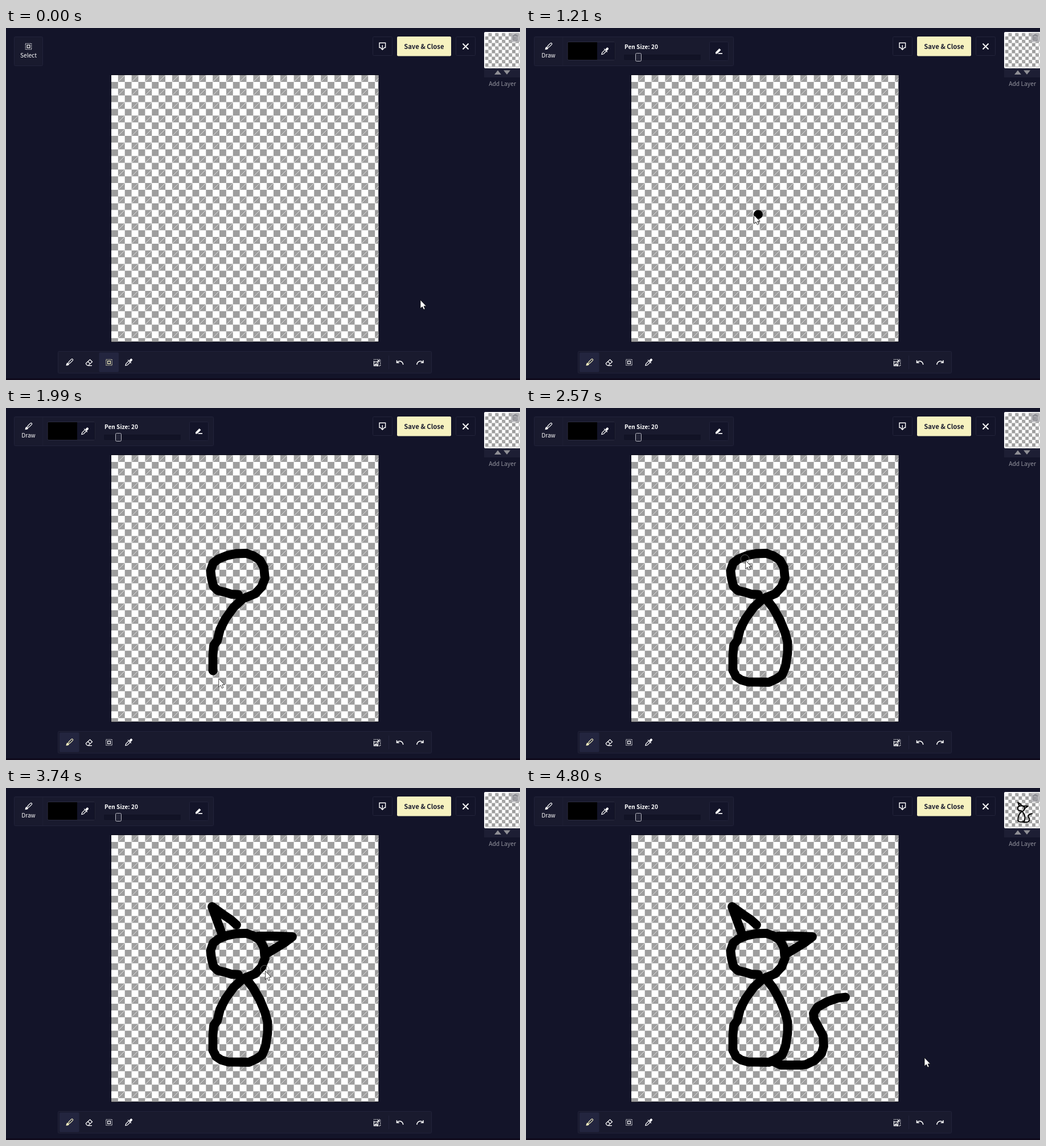
Write an HTML page that moves like this. It is 903 px wide and 620 px high and loops after 4.82 s.

```html
<!DOCTYPE html>
<html lang="en">
<head>
<meta charset="utf-8">
<title>Drawing a cat</title>
<style>
  html, body { margin: 0; width: 100%; height: 100%; overflow: hidden; background: #131429; }
  svg { display: block; }
  text { font: 500 10.1px "Noto Sans CJK JP", "Noto Sans CJK SC", "Noto Sans", sans-serif; fill: #fff; }
  .bold { font-weight: 700; }
  .mid { text-anchor: middle; }
  .panel { fill: #191a2e; stroke: #22233a; }
  .button { fill: #131429; stroke: #22233a; }
  .active { fill: #23253f; }
  .icon { fill: none; stroke: #fff; color: #fff; stroke-width: 1.2; }
  .icon.on { stroke: #f6f2c0; color: #f6f2c0; }
  .solid { fill: currentColor; stroke: none; }
  .ink { fill: none; stroke: #000; stroke-width: 15.8; stroke-linecap: round; stroke-linejoin: round; }
</style>
</head>
<body>
<svg id="stage" width="903" height="620" viewBox="0 0 903 620">
  <defs>
    <g id="brush" transform="rotate(45)">
      <rect x="-1.6" y="-8" width="3.2" height="9.5" rx="1.6"/>
      <path class="solid" d="M-2.3 2.5h4.6q.6 3-2.3 5.8q-2.9-2.8-2.3-5.8z"/>
    </g>
    <g id="eraser">
      <path d="M1.5-5.5L5.5-1.5L-1.5 5H-3L-5.5 2.3V1zM-2.3-2L2 2M-2 5.2H5"/>
    </g>
    <g id="select">
      <rect x="-5.2" y="-5.2" width="10.4" height="10.4" stroke-dasharray="1.3 1.3"/>
      <rect x="-2.4" y="-2.4" width="4.8" height="4.8"/>
    </g>
    <g id="dropper" transform="rotate(45)">
      <rect class="solid" x="-2" y="-8.3" width="4" height="5.5" rx="1.8"/>
      <path d="M-4-2.2H4M-1.7-2V5L0 7.8L1.7 5V-2"/>
    </g>
    <g id="resize">
      <path d="M-6-5.7H6M5.7-5V6M-5.7-3V0M0 5.7H6" stroke-dasharray="1.5 1.5"/>
      <rect x="-5.6" y="-1.5" width="7" height="7"/>
      <path d="M-4 4L-1.5 1.5L0 4zM0-1L3.5-4M.8-4H3.5V-1.3"/>
    </g>
    <path id="undo" d="M-5.5-4.2V0H-1.2M-5.2-.3C-2-4.2 4.5-3.5 5.8 3.5" stroke-width="1.5"/>
    <g id="pencil">
      <path class="solid" d="M-5.5 4.5V1.8L1.2-5L4-2.2L-2.8 4.5zM0 3H6.5V4.8H-1.5z"/>
    </g>
    <path id="download" d="M-2.5 2.5H-5.3V-5.8H5.3V2.5H2.5M0-2V6M-3 3.2L0 6.2L3 3.2" stroke-width="1.4"/>
  </defs>

  <rect width="903" height="620" fill="#131429"/>
  <rect y="617" width="903" height="3" fill="#0f0a1c"/>

  <!-- tool options -->
  <rect class="panel" id="options" x="14.5" y="15.5" height="51" rx="2"/>
  <g id="selectOptions">
    <use href="#select" class="icon" x="39.5" y="32.5"/>
    <text class="mid" x="39.5" y="51.5">Select</text>
  </g>
  <g id="drawOptions">
    <path d="M64.5 16V66" stroke="#1d1e33"/>
    <use href="#brush" class="icon" transform="translate(39.5 32.5)"/>
    <text class="mid" x="39.5" y="51.5">Draw</text>
    <rect x="73" y="24.5" width="83" height="32" rx="2" fill="#000" stroke="#2a2b3e"/>
    <rect x="125" y="25" width="30.5" height="31" fill="#131429"/>
    <use href="#dropper" class="icon" transform="translate(138.5 41)"/>
    <text class="bold" x="173" y="36.5">Pen Size: 20</text>
    <rect x="173" y="47.5" width="133" height="8" fill="#121326" stroke="#0f1022"/>
    <rect x="192.5" y="44.5" width="10" height="14" rx="2" fill="#222336" stroke="#b9b9c2"/>
    <rect class="button" x="322.5" y="24.5" width="33" height="33" rx="2"/>
    <use href="#pencil" class="icon" x="338.5" y="41"/>
  </g>

  <!-- file buttons -->
  <rect class="button" x="644.5" y="15.5" width="34" height="33" rx="2"/>
  <use href="#download" class="icon" x="661.3" y="32"/>
  <rect x="687" y="15" width="95" height="34.5" rx="2" fill="#f6f2c0"/>
  <text class="bold mid" x="734.3" y="37" style="font-size:11.3px;fill:#1a1b2e">Save &amp; Close</text>
  <rect class="button" x="790.5" y="15.5" width="34" height="33" rx="2"/>
  <path d="M802.5 27.5l10 10m0-10l-10 10" stroke="#fff" stroke-width="1.9"/>

  <!-- layer list -->
  <rect x="840" y="71" width="63" height="16" fill="#1d1e34"/>
  <rect x="840" y="7" width="64" height="64" rx="2" fill="#fff"/>
  <svg id="thumb" x="841.6" y="8.8" width="60.4" height="60.4"></svg>
  <rect x="887" y="8.5" width="16" height="16.5" rx="2" fill="#b0b0b4" opacity=".8"/>
  <path d="M890 13.5H899M893 13V11.5H896V13M891 14V21.5H898V14M893.3 15.5V20M895.7 15.5V20" fill="none" stroke="#77777f"/>
  <path d="M858 82l6-7.5l6 7.5zM874 74.5h12l-6 7.5z" fill="#8f8f95"/>
  <text class="mid" x="872" y="101.8" style="font-size:10.3px;fill:#9696a0">Add Layer</text>

  <!-- artwork -->
  <rect x="184" y="82" width="471.5" height="471.5" fill="#0a0a18"/>
  <svg id="board" x="185" y="83" width="469.5" height="469.5"></svg>

  <!-- toolbar -->
  <rect class="panel" x="91.5" y="569.5" width="656" height="38.5" rx="2"/>
  <rect class="active" id="active" y="571.5" width="34.5" height="34.5" rx="2"/>
  <path d="M672.5 577V601" stroke="#22233a"/>
  <use href="#brush" class="icon" id="brushTool" transform="translate(111.5 589)"/>
  <use href="#eraser" class="icon" x="146" y="589.5"/>
  <use href="#select" class="icon" id="selectTool" x="181" y="589"/>
  <use href="#dropper" class="icon" transform="translate(215.5 589)"/>
  <use href="#resize" class="icon" x="652" y="589.5"/>
  <use href="#undo" class="icon" x="692" y="589.5"/>
  <use href="#undo" class="icon" transform="translate(727.5 589.5) scale(-1 1)"/>

  <!-- pointer -->
  <g id="pointer">
    <circle id="tip" cx="-1" cy="-2.5" r="7.5" fill="none" stroke="#777" stroke-width=".8"/>
    <path id="arrow" d="M0 0V15L3.4 11.9L5.7 17L8.2 15.9L6 10.9H10.4z" fill="#fff" stroke="#111" stroke-width=".8"/>
    <path id="hand" d="M-1.7 1.5Q0-1 1.7 1.5V7L7.5 8.2Q9 8.8 8.8 10.5L7.8 15V19.5H-2.5V16.5L-6.3 11.5Q-6 9-3.5 10.5L-1.7 12z" fill="#fff" stroke="#111" stroke-width=".8"/>
  </g>
</svg>
<script>
const LOOP = 4820, LEAD = 20, PICK = 365;
const $ = id => document.getElementById(id);

function add(parent, tag, attrs) {
  const el = document.createElementNS('http://www.w3.org/2000/svg', tag);
  for (const key in attrs) el.setAttribute(key, attrs[key]);
  return parent.appendChild(el);
}

function checker(parent, cell) {
  let squares = '', seams = '';
  for (let row = 0; row < 40; row++) {
    for (let col = 1 - row % 2; col < 40; col += 2) {
      const x = col * cell, y = row * cell;
      squares += `M${x} ${y}h${cell}v${cell}h${-cell}z`;
      if (row % 2 === 0) seams += `M${x} ${y + cell}l${cell} ${-cell}`;
    }
  }
  add(parent, 'rect', { width: '100%', height: '100%', fill: '#fff' });
  add(parent, 'path', { d: squares, fill: '#9e9e9e' });
  add(parent, 'path', { d: seams, stroke: '#e4e4e4', 'stroke-width': cell / 12 });
}

checker($('board'), 11.875);
checker($('thumb'), 5.94);
const drawing = add($('board'), 'g', { class: 'ink', transform: 'translate(-185 -83)' });
const preview = add($('thumb'), 'g', { class: 'ink', transform: 'translate(.4 .7) scale(.1255) translate(-185 -83)' });

// Pointer travel: start, end, points; `saved` is when an inked stretch reaches the preview.
const travel = [];
function go(start, end, points, saved) {
  const path = add(drawing, 'path', { d: 'M' + points });
  const step = { start, end, path, saved, length: path.getTotalLength() };
  if (saved) step.copy = add(preview, 'path', { d: 'M' + points });
  else path.style.display = 'none';
  travel.push(step);
}

go(40, 360, '728 479 119 587');
go(782, 1060, '119 587 408 328');
// head
go(1210, 1570, '408 328.5 396 328 385 324.5 372 321.5 364.5 314 361 300 359.5 286 364 273 373 266 388 260 404 256.5 422 256', 3920);
go(1570, 1730, '422 256 434 260 446 268 453 281 455 300 449 315', 3920);
// body
go(1730, 1990, '449 315 438 327 416 336 400 351 385 372 376 390 371 410 365 418 363.5 435 363.5 462', 3920);
go(1990, 2310, '363.5 462 369 473 378 479 390 482.5 427 483 440 477 450 470 456 455 459.5 432 459.5 412 455 395 446 373 434 352 421 335', 3920);
// ear
go(2330, 2640, '421 335 379 256');
go(2730, 3050, '379 256 372 237 366 220 362 209 380 222 395 232 405 241', 3920);
// beak
go(3070, 3275, '405 241 443 260');
go(3390, 3700, '443 261 475 261 503 262 490 272 472 283 459 291', 3920);
// foot and tail
go(3730, 3918, '459 291 438 481');
go(4000, 4150, '433 481 448 488 484 488', 4690);
go(4150, 4430, '484 488 492 487 507 480 519 468 523 455 522 437 513 420 506 407 505 397 512 386 530 376 548 370 561 368.5', 4690);
go(4695, 4818, '565 368 700 475');

const progress = (step, t) => Math.min(1, Math.max(0, (t - step.start) / (step.end - step.start)));
const show = (el, on) => { el.style.display = on ? '' : 'none'; };

function render(t) {
  const draw = t >= PICK;
  show($('drawOptions'), draw);
  show($('selectOptions'), !draw);
  $('options').setAttribute('width', draw ? 350 : 50);
  $('active').setAttribute('x', draw ? 94 : 163.5);
  $('brushTool').classList.toggle('on', draw);
  $('selectTool').classList.toggle('on', !draw);

  for (const step of travel) {
    if (!step.saved) continue;
    show(step.path, t >= step.start);
    show(step.copy, t >= step.saved);
    step.path.style.strokeDasharray = `${progress(step, t) * step.length} 999`;
  }

  const ahead = t + LEAD;
  const now = travel.filter(step => step.start <= ahead).pop() || travel[0];
  const { x, y } = now.path.getPointAtLength(progress(now, ahead) * now.length);
  const offset = now.saved ? 1.5 : 0;
  $('pointer').setAttribute('transform', `translate(${x + offset} ${y + offset})`);
  const overTool = y > 568 && x < 235;
  const overBoard = x > 185 && x < 655 && y > 83 && y < 552;
  const penDown = now.saved && ahead < now.end + LEAD;
  show($('hand'), overTool);
  show($('arrow'), !overTool);
  show($('tip'), draw && overBoard && !penDown);
}

function frame() {
  render(performance.now() % LOOP);
  requestAnimationFrame(frame);
}
frame();
</script>
</body>
</html>
```
